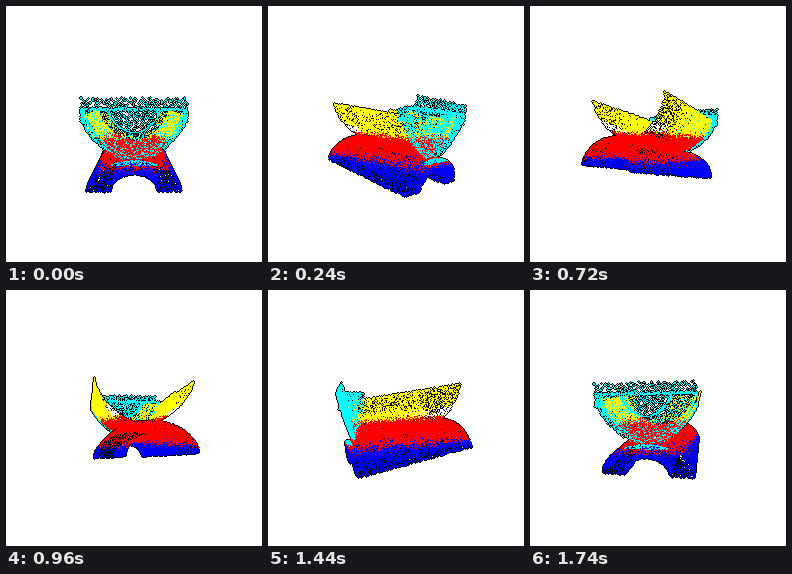
Animation, 256 px wide and 256 px high, one loop 1800 ms. Source, as a matplotlib script:

```python
import numpy as np
import matplotlib.pyplot as plt
from matplotlib.animation import FuncAnimation

SIZE, FRAMES = 256, 30
CX, CY, CAMERA = 127.5, 126.5, 220
BLACK_DEPTH = 70
CYAN, YELLOW, RED, BLUE, WHITE = (
    (0, 255, 255), (255, 255, 0), (255, 0, 0), (0, 0, 255), (255, 255, 255))
BULGE = 1.6  # superellipse exponent of the bowl section

rng = np.random.default_rng(4)


def uni(n, lo=0.0, hi=1.0):
    return rng.uniform(lo, hi, n)


def section(t):
    """Point on the lower half of the unit superellipse."""
    c, s = np.cos(t), np.sin(t)
    return np.sign(c) * np.abs(c) ** (2 / BULGE), np.abs(s) ** (2 / BULGE)


def flat(p, color):
    return p, np.tile(color, (len(p), 1))


def two_tone(y, z):
    edge = 1.5 + 0.07 * z + rng.normal(0, 1.5, len(y))
    return np.where((y > edge)[:, None], RED, YELLOW)


def trough(n, back, r):
    """Tilted pipe half, open at the back; r scales its section."""
    side, drop = section(uni(n, 0, np.pi))
    z0, z1 = back + 5 * drop, 52 - 10 * drop
    z = z0 + (z1 - z0) * uni(n)
    rim = -21 + 0.185 * z
    y = rim + 35 * r * drop
    col = two_tone(y, z)
    col[(z < -24 + rng.normal(0, 4, n)) & (y > rim + 19) & (y < 0.07 * z + 1)] = WHITE
    col[z > 41 + rng.normal(0, 1.5, n)] = CYAN
    return np.c_[40.5 * r * side, y, z], col


def cap(n):
    """Slanted front plate: a band on top of the bowl section."""
    x, y = uni(3 * n, -40.5, 40.5), uni(3 * n, -26.5, 24.5)
    below = np.maximum(y + 12, 0) / 36.5
    keep = np.flatnonzero(np.abs(x / 40.5) ** BULGE + below ** BULGE < 1)[:n]
    x, y = x[keep], y[keep]
    return flat(np.c_[x, y, 56 - 0.28 * (y + 26.5)], CYAN)


def end_face(n):
    """Thick end of the trough behind the cap, with a round hollow."""
    side, drop = section(uni(n, 0, np.pi))
    r = np.sqrt(uni(n, 0.25, 0.95))
    x, y = 40.5 * r * side, -16 + 38 * r * drop
    z = 42 - 0.2 * y
    return np.c_[x, y, z], two_tone(y, z)


def hollow(n):
    side, drop = section(uni(n, 0, np.pi))
    return flat(np.c_[20 * side, -17 + 17 * drop, uni(n, 40, 52)], CYAN)


def shelf(n):
    return flat(np.c_[uni(n, -40, 40), uni(n, -19, -18), uni(n, 40, 54)], CYAN)


def shoulders(n):
    """Upright sides between shelf and trough rim."""
    x = 40.5 * rng.choice([-1, 1], n)
    return flat(np.c_[x, uni(n, -18.5, -8), uni(n, 39, 53)], CYAN)


def arch(n, r, z):
    """Arched foot; r runs from the inner (0) to the outer (1) surface."""
    t = uni(n, 0, np.pi)
    x = (19 + 19 * r) * np.cos(t)
    rise = (14.5 + 10.5 * r) * np.sin(t)
    y = 39 + 0.19 * z - rise
    edge = 25.5 + 0.075 * z + rng.normal(0, 1.5, n)
    col = np.where((y > edge)[:, None], BLUE, RED)
    col[(z > 42) & (rise > 22)] = CYAN
    return np.c_[x, y, z - 2 + 0.2 * rise], col


parts = [
    trough(8000, -48, 1),
    trough(4000, -18, 0.92),
    cap(1500),
    end_face(1100),
    hollow(450),
    shelf(500),
    shoulders(350),
    arch(10500, 1, uni(10500, -59, 45)),
    arch(5000, 0, uni(5000, -59, 45)),
    arch(1300, uni(1300), np.full(1300, 45.0)),
    arch(1300, uni(1300), np.full(1300, -59.0)),
]
points = np.vstack([p for p, _ in parts])
colors = np.vstack([c for _, c in parts]).astype(np.uint8)
RIM = [(-1, 0), (1, 0), (0, -1), (0, 1)]


def render(k):
    a = 2 * np.pi * k / FRAMES
    x, y, z = points.T
    depth = z * np.cos(a) - x * np.sin(a)
    s = CAMERA / (CAMERA - depth)
    px = np.round(CX + (x * np.cos(a) + z * np.sin(a)) * s).astype(int)
    py = np.round(CY + y * s).astype(int)

    # each dot is one coloured pixel with black neighbours lying deeper
    cells = RIM + [(0, 0)]
    xs = np.concatenate([px + i for i, _ in cells])
    ys = np.concatenate([py + j for _, j in cells])
    ds = np.concatenate([depth - BLACK_DEPTH] * len(RIM) + [depth])
    cs = np.vstack([np.zeros_like(colors)] * len(RIM) + [colors])
    order = np.argsort(ds, kind="stable")
    img = np.full((SIZE, SIZE, 3), 255, np.uint8)
    img[ys[order], xs[order]] = cs[order]
    return img


fig = plt.figure(figsize=(SIZE / 100, SIZE / 100), dpi=100, facecolor="white")
ax = fig.add_axes([0, 0, 1, 1])
ax.axis("off")
view = ax.imshow(render(0), interpolation="nearest", aspect="auto")


def update(k):
    view.set_data(render(k))
    return [view]


anim = FuncAnimation(fig, update, frames=FRAMES, interval=60,
                     repeat=True, repeat_delay=0, blit=False)
plt.show()
```
